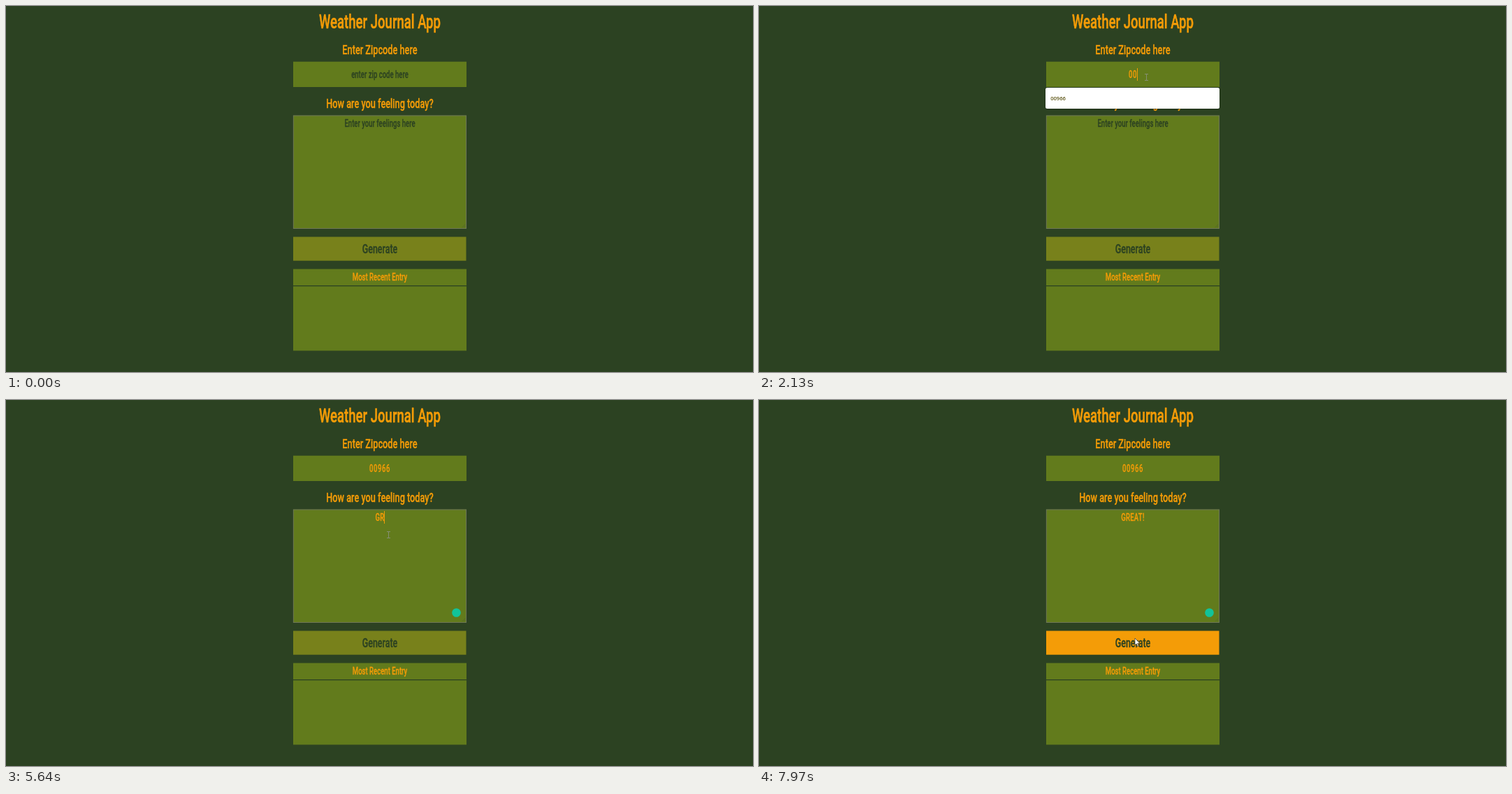
Write an HTML page with a canvas that moves like this. It is 1069x524 px and loops after 8 s.

```html
<!DOCTYPE html>
<html lang="en">
<head>
<meta charset="utf-8">
<title>Weather Journal App</title>
<style>
html, body { margin: 0; width: 100%; height: 100%; overflow: hidden; background: #2c4222; }
canvas { display: block; }
</style>
</head>
<body>
<canvas id="stage" width="1069" height="524"></canvas>
<script>
const ctx = document.getElementById('stage').getContext('2d');
const LOOP = 8000, MID = 535;
const BG = '#2c4222', FIELD = '#627b1c', ORANGE = '#f59c07';
const FACE = 'Roboto, "Liberation Sans", sans-serif';
const SLIM = 0.688; // the whole page is set in one condensed face

// [time, text] pairs: what each field holds from that time on
const zipKeys = [[1980, '0'], [2130, '00'], [2910, '009'], [3230, '0096'], [3440, '00966']];
const moodKeys = [[5410, 'G'], [5640, 'GR'], [5870, 'GRE'], [6040, 'GREA'], [6270, 'GREAT'], [6570, 'GREAT!']];
// spans in which the caret shows
const zipCaret = [[890, 1420], [1980, 2660], [2910, 3990]];
const moodCaret = [[4540, 5100], [5410, 7100], [7590, 7970]];
const clicks = [[890, 1050], [4540, 4620]];
const moves = [
  [110, 730, 8, [997, 490], [554.5, 102]],
  [3990, 4310, 4, [554.5, 102], [547.5, 193]],
  [6820, 7590, 10, [547.5, 193], [538, 341]]
];

const within = (spans, t) => spans.some(([a, b]) => t >= a && t < b);
const typed = (keys, t) => keys.reduce((s, [at, v]) => (t >= at ? v : s), '');
const clamp = v => Math.max(0, Math.min(1, v));
const ease = p => p * p * (3 - 2 * p);

function box(x, y, x2, y2, color) {
  ctx.fillStyle = color;
  ctx.fillRect(x, y, x2 - x, y2 - y);
}

// draws centred condensed text, returns its width
function label(str, y, size, color, spacing = 0) {
  ctx.save();
  ctx.font = `500 ${size}px ${FACE}`;
  ctx.letterSpacing = spacing + 'px';
  ctx.textAlign = 'center';
  ctx.fillStyle = ctx.strokeStyle = color;
  ctx.lineWidth = size * 0.02;
  ctx.lineJoin = 'round';
  const w = ctx.measureText(str).width * SLIM;
  ctx.translate(MID, y);
  ctx.scale(SLIM, 1);
  ctx.fillText(str, 0, 0);
  ctx.strokeText(str, 0, 0);
  ctx.restore();
  return w;
}

function field(str, hint, y, spacing, caret) {
  const w = str ? label(str, y, 13.9, ORANGE, spacing) : 0;
  if (!str) label(hint, y, 13.9, BG);
  if (caret) {
    const x = Math.round(MID + w / 2), top = Math.round(y) - 14;
    box(x, top, x + 1, top + 18, str ? ORANGE : '#a3ad4a');
  }
}

function pointerAt(t) {
  let pos = null;
  for (const [start, end, n, a, b] of moves) {
    if (t < start) break;
    const step = Math.floor(clamp((t - start) / (end - start)) * n + 1e-6);
    const p = ease(step / n);
    pos = [a[0] + (b[0] - a[0]) * p, a[1] + (b[1] - a[1]) * p];
  }
  return pos;
}

function inField([x, y]) {
  return x > 411 && x < 659 && ((y > 80 && y < 116) || (y > 157 && y < 319));
}

function ibeam(x, y) {
  ctx.strokeStyle = '#848f72';
  ctx.lineWidth = 1;
  x = Math.floor(x) + 0.5;
  y = Math.round(y);
  ctx.beginPath();
  for (const s of [-1, 1]) {
    ctx.moveTo(x - 2.5, y + s * 4.5);
    ctx.lineTo(x + 2.5, y + s * 4.5);
  }
  ctx.moveTo(x, y - 4.5);
  ctx.lineTo(x, y + 4.5);
  ctx.stroke();
}

function arrow(x, y) {
  ctx.save();
  ctx.translate(x, y);
  ctx.beginPath();
  for (const [px, py] of [[0, 0], [0, 10], [2.2, 8], [3.8, 11.8], [5.3, 11.1], [3.7, 7.5], [6.8, 7.3]]) {
    ctx.lineTo(px, py);
  }
  ctx.closePath();
  ctx.fillStyle = '#fff';
  ctx.strokeStyle = '#333';
  ctx.lineWidth = 0.7;
  ctx.fill();
  ctx.stroke();
  ctx.restore();
}

function dot(x, y, r, color) {
  ctx.fillStyle = color;
  ctx.beginPath();
  ctx.arc(x, y, r, 0, Math.PI * 2);
  ctx.fill();
}

function suggestions() {
  ctx.save();
  ctx.shadowColor = 'rgba(0,0,0,.45)';
  ctx.shadowBlur = 2;
  ctx.shadowOffsetY = 0.5;
  ctx.fillStyle = '#fff';
  ctx.beginPath();
  ctx.roundRect(410, 117, 249, 30, 2.5);
  ctx.fill();
  ctx.restore();
  ctx.font = '600 7.6px "Open Sans", "Noto Sans", sans-serif';
  ctx.fillStyle = '#5b5312';
  ctx.fillText('00966', 417.2, 134.8);
}

function textarea() {
  box(411, 156.6, 659, 319, FIELD);
  ctx.lineWidth = 1;
  ctx.strokeStyle = 'rgba(118,118,118,.65)';
  ctx.strokeRect(411.3, 157, 247.2, 161.5);
  ctx.strokeStyle = '#4f6230';
  ctx.lineWidth = 0.7;
  ctx.beginPath();
  for (const d of [5, 2.5]) {
    ctx.moveTo(657.5 - d, 317.3);
    ctx.lineTo(657.5, 317.3 - d);
  }
  ctx.stroke();
}

function button(t) {
  const p = ease(clamp((t - 7450) / 500));
  const rgb = [[120, 129, 27], [244, 156, 7]];
  const mix = rgb[0].map((c, i) => Math.round(c + (rgb[1][i] - c) * p));
  box(411, 330.5, 658.5, 364.7, `rgb(${mix})`);
  label('Generate', 354, 18.1, BG);
}

function draw(t) {
  box(0, 0, 1069, 524, BG);
  label('Weather Journal App', 31.5, 27, ORANGE);
  label('Enter Zipcode here', 68.7, 18.5, ORANGE);
  label('How are you feeling today?', 146, 18.5, ORANGE);

  box(411, 79.7, 659, 116, FIELD);
  field(typed(zipKeys, t), 'enter zip code here', 102.8, 0.8, within(zipCaret, t));
  textarea();
  field(typed(moodKeys, t), 'Enter your feelings here', 172.5, 0.3, within(moodCaret, t));
  if (t >= 4940) dot(644.5, 304.5, 6.3, '#12c39a');

  button(t);
  box(411, 376.6, 659, 400, FIELD);
  label('Most Recent Entry', 393.3, 13.9, ORANGE);
  box(411, 401.3, 659, 493.5, FIELD);

  if (t >= 980 && t < 3440) suggestions();

  const pos = pointerAt(t);
  if (!pos) return;
  if (within(clicks, t)) dot(pos[0] - 1, pos[1] - 1, 7, 'rgba(188,200,28,.85)');
  else if (inField(pos)) ibeam(...pos);
  else arrow(...pos);
}

function tick() {
  draw(performance.now() % LOOP);
  requestAnimationFrame(tick);
}
tick();
</script>
</body>
</html>
```
